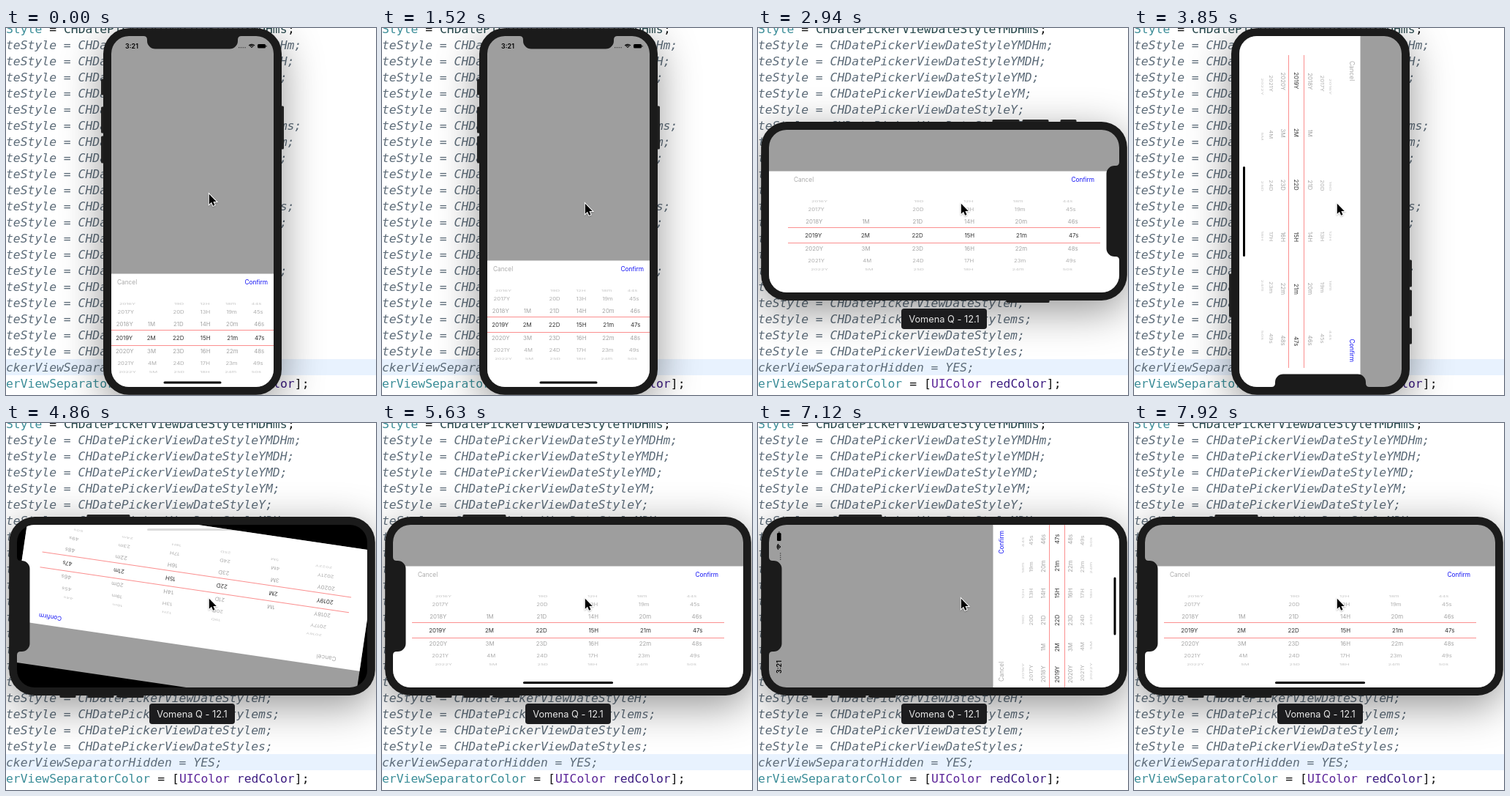
These frames come from a looping animation (506x501 px, 8 s). An HTML page with a canvas:

```html
<!DOCTYPE html>
<html lang="en">
<head>
<meta charset="utf-8">
<title>Date picker rotation</title>
<style>
  html, body { margin: 0; width: 506px; height: 501px; overflow: hidden; background: #fff; }
  canvas { display: block; }
</style>
</head>
<body>
<canvas id="stage" width="506" height="501"></canvas>
<script>
const ctx = document.getElementById('stage').getContext('2d');
const LOOP = 8000;
const UI = 'Inter, "Liberation Sans", sans-serif';
const CODE = '"DejaVu Sans Mono", "Liberation Mono", monospace';
const BODY = '#1b1b1b', COMMENT = '#5d6c79', TEAL = '#3b8d98', LINE = '#fb8f8f';
const CHAR = 9.87;
const STYLES = 'YMDHm YMDH YMD YM Y MDHms MDHm MDH MD M DHms DHm DH D Hms Hm H ms m s'.split(' ');
const COLUMNS = [[2019, 'Y'], [2, 'M'], [22, 'D'], [15, 'H'], [21, 'm'], [47, 's']];

// dev: device angle; a, b: interface angles; from, to: 0 portrait, 1 landscape
const SCENES = [
  { at: 0,    dev: 0,   a: 0,   b: 0,   from: 0, to: 0 },
  { at: 2420, dev: 90,  a: 90,  b: 0,   from: 0, to: 1, go: 2600, start: 2540, dur: 400 },
  { at: 3850, dev: 180, a: 90,  b: 90,  from: 1, to: 1 },
  { at: 4620, dev: 270, a: 180, b: 360, from: 1, to: 1, go: 4770, start: 4765, dur: 625 },
  { at: 5980, dev: 0,   a: 90,  b: 0,   from: 1, to: 0, go: 6220, start: 6155, dur: 400 },
  { at: 7120, dev: 270, a: -90, b: 0,   from: 0, to: 1, go: 7350, start: 7300, dur: 400 }
];

const lerp = (a, b, p) => a + (b - a) * p;
const clamp = v => Math.max(0, Math.min(1, v));
const turn = deg => ctx.rotate(deg * Math.PI / 180);

// cubic-bezier(.42, 0, .58, 1)
function ease(x) {
  let lo = 0, hi = 1;
  for (let i = 0; i < 24; i++) {
    const s = (lo + hi) / 2, r = 1 - s;
    if (3 * r * r * s * .42 + 3 * r * s * s * .58 + s * s * s < x) lo = s; else hi = s;
  }
  return lo * lo * (3 - 2 * lo);
}

function group(draw) {
  ctx.save();
  draw();
  ctx.restore();
}

function round(x, y, w, h, r) {
  ctx.beginPath();
  ctx.roundRect(x, y, w, h, r);
}

function box(x, y, w, h, color) {
  ctx.fillStyle = color;
  ctx.fillRect(x, y, w, h);
}

// y is the middle of the capitals
function text(str, x, y, size, color, align = 'center', weight = 400) {
  ctx.font = `${weight} ${size}px ${UI}`;
  ctx.textAlign = align;
  ctx.fillStyle = color;
  ctx.fillText(str, x, y + size * .36);
}

function codeLine(row, parts, italic) {
  let x = 0;
  ctx.font = `${italic ? 'italic ' : ''}${CHAR / .602}px ${CODE}`;
  ctx.textAlign = 'left';
  for (const [str, color] of parts) {
    ctx.fillStyle = color;
    ctx.fillText(str, x, 7 + 22 * row);
    x += str.length * CHAR;
  }
}

function editor() {
  box(0, 0, 506, 501, '#fff');
  box(0, 452, 506, 22, '#e8f2fe');
  codeLine(0, [['Style', TEAL], [' = ', '#111'], ['CHDatePickerViewDateStyleYMDHms', '#26474b'], [';', '#111']]);
  STYLES.forEach((s, i) =>
    codeLine(i + 1, [[`teStyle = CHDatePickerViewDateStyle${s};`, COMMENT]], true));
  codeLine(21, [['ckerViewSeparatorHidden = YES;', COMMENT]], true);
  codeLine(22, [['erViewSeparatorColor', TEAL], [' = [', '#111'], ['UIColor', '#5c2699'],
    [' ', '#111'], ['redColor', '#3d1d81'], ['];', '#111']]);
}

function body() {
  ctx.fillStyle = '#2a2a2a';
  for (const [x, y, h] of [[-125, -181, 22], [-125, -143, 36], [-125, -103, 37], [119, -144, 59]]) {
    round(x, y, 6, h, 1.5);
    ctx.fill();
  }
  ctx.fillStyle = BODY;
  ctx.shadowColor = 'rgba(0,0,0,.42)';
  ctx.shadowBlur = 56;
  ctx.shadowOffsetY = 14;
  round(-122, -250.3, 244, 500.6, 35);
  ctx.fill();
}

function notch() {
  const y = -239.5;
  ctx.fillStyle = BODY;
  ctx.beginPath();
  ctx.moveTo(-67, y - 1);
  ctx.lineTo(-67, y);
  ctx.quadraticCurveTo(-62, y, -62, y + 5);
  ctx.arcTo(-62, y + 17.5, -50, y + 17.5, 11);
  ctx.arcTo(62, y + 17.5, 62, y + 5, 11);
  ctx.lineTo(62, y + 5);
  ctx.quadraticCurveTo(62, y, 67, y);
  ctx.lineTo(67, y - 1);
  ctx.fill();
}

function statusBar(w) {
  text('3:21', 28, 13.5, 8.9, '#000', 'center', 600);
  ctx.fillStyle = '#444';
  for (let i = 0; i < 4; i++) ctx.fillRect(w - 48 + 2.8 * i, 15, 1.3, 1.3);
  ctx.strokeStyle = '#000';
  ctx.lineWidth = 1.3;
  for (const r of [1.2, 3.2, 5.2]) {
    ctx.beginPath();
    ctx.arc(w - 30, 16.5, r, -Math.PI * .76, -Math.PI * .24);
    ctx.stroke();
  }
  ctx.fillStyle = '#000';
  round(w - 22, 11, 11, 5.6, 1.5);
  ctx.fill();
  ctx.fillRect(w - 10.5, 12.8, 1, 2);
}

// Rows sit on a cylinder around the selected line
function picker(x, w, mid) {
  const R = 53.3, STEP = .354;
  for (let row = -3; row <= 3; row++) {
    const c = Math.cos(row * STEP), y = mid + R * Math.sin(row * STEP);
    const near = 1 - .09 * (1 - c);
    const color = ['#333', '#a2a2a2', '#acacac', '#c4c4c4'][Math.abs(row)];
    COLUMNS.forEach(([value, unit], i) => {
      if (value + row < 1) return;
      const cx = w * (i + .5) / 6 - .8;
      group(() => {
        ctx.translate(x + w / 2 + (cx - w / 2) * near, y);
        ctx.scale(near, c);
        text(value + row + unit, 0, 0, 7.9, color);
      });
    });
  }
  box(x, mid - 11, w, 1, LINE);
  box(x, mid + 10, w, 1, LINE);
}

function view(land, pickerLand, slide) {
  const w = lerp(222, 479, land), h = lerp(479, 222, land);
  const inset = 26 * land, top = h - lerp(172.5, 165.5, land) + slide;
  ctx.translate(-w / 2, -h / 2);
  box(0, 0, w, h, '#9e9e9e');
  box(0, top, w, h - top, '#fff');
  group(() => {
    ctx.globalAlpha = 1 - land;
    statusBar(w);
  });
  text('Cancel', inset + 8, top + 11.5, 8.3, '#aaa', 'left');
  text('Confirm', w - inset - 8, top + 11.5, 8.3, '#1010f5', 'right');
  picker(inset, pickerLand ? 427 : 222, top + 87.5);
}

function homeBar(land, angle, alpha) {
  const len = land ? 123 : 79;
  turn(angle);
  ctx.globalAlpha = alpha;
  ctx.fillStyle = '#000';
  round(-len / 2, land ? 103 : 232, len, 3, 1.5);
  ctx.fill();
}

function cursor(x, y) {
  const pts = [[0, 0], [0, 14], [3.2, 11], [5.4, 16], [7.7, 15], [5.6, 10.2], [10, 10.2]];
  ctx.translate(x + .8, y + .8);
  ctx.beginPath();
  pts.forEach(p => ctx.lineTo(...p));
  ctx.closePath();
  ctx.shadowColor = 'rgba(0,0,0,.25)';
  ctx.shadowBlur = 2;
  ctx.shadowOffsetY = 1;
  ctx.lineWidth = 2;
  ctx.strokeStyle = '#fff';
  ctx.stroke();
  ctx.shadowColor = 'transparent';
  ctx.fillStyle = '#000';
  ctx.fill();
}

function label() {
  ctx.fillStyle = '#1c1c1e';
  round(196, 383, 117, 28, 4);
  ctx.fill();
  text('Vomena Q - 12.1', 254.5, 397.5, 12.8, '#e6e6e6');
}

// The interface turns in held steps, two long ones and then shorter ones
function rotation(s, t) {
  if (!s.go || t < s.go) return { p: 0, home: 1, done: false };
  const el = t - s.go, hold = el < 180 ? 90 : 60;
  const q = s.go + Math.floor(el / hold) * hold - s.start;
  const done = t >= s.start + s.dur;
  return done
    ? { p: 1, home: clamp((q - s.dur) / 180), done }
    : { p: ease(clamp(q / s.dur)), home: clamp(1 - q / 110), done };
}

function render(t) {
  const s = SCENES.filter(k => k.at <= t).pop();
  const { p, home, done } = rotation(s, t);
  const wide = s.dev % 180 !== 0;
  const early = t < 60 ? 0 : t < 140 ? 1 : 2;
  const slide = [18, 7, 0][early];

  editor();
  group(() => {
    ctx.translate(wide ? 254.5 : 255, wide ? 250 : 250.5);
    group(() => { turn(s.dev); body(); });
    group(() => {
      if (wide) round(-239.5, -111, 479, 222, 24);
      else round(-111, -239.5, 222, 479, 24);
      ctx.clip();
      box(-250, -250, 500, 500, '#000');
      group(() => {
        turn(lerp(s.a, s.b, p));
        view(lerp(s.from, s.to, p), p > 0 ? s.to : s.from, slide);
      });
      group(() => homeBar(done ? s.to : s.from, done ? s.b : s.a, home));
    });
    group(() => { turn(s.dev); notch(); });
  });
  if (wide) label();
  group(() => cursor(277, [226, 233, 239][early]));
}

const begin = performance.now();
function tick() {
  render((performance.now() - begin) % LOOP);
  requestAnimationFrame(tick);
}
tick();
</script>
</body>
</html>
```
